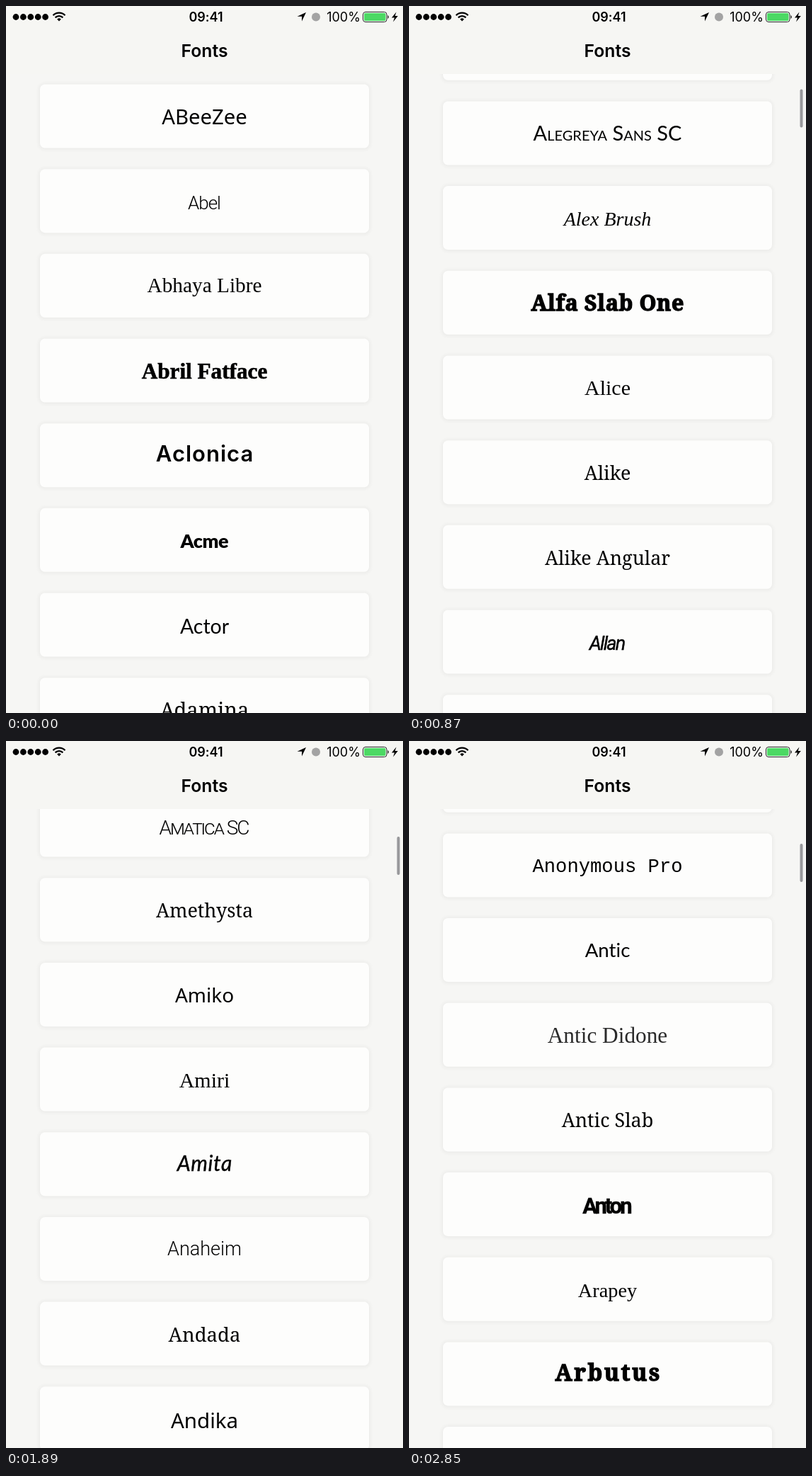
These frames come from a looping animation (561 by 998 pixels, 2880 ms). An HTML page:

```html
<!DOCTYPE html>
<html lang="en">
<head>
<meta charset="utf-8">
<title>Fonts</title>
<style>
  html, body { margin: 0; width: 100%; height: 100%; overflow: hidden; background: #f6f6f4; }
  svg { display: block; width: 100%; height: 100%; font-variant-ligatures: none; }
  .status, .title { font-family: Inter, sans-serif; }
  .title { font-size: 24.7px; font-weight: 600; text-anchor: middle; }
  .row text { text-anchor: middle; }
  .sans { font-family: 'Noto Sans', sans-serif; }
  .medium { font-family: 'Noto Sans', sans-serif; stroke: #000; stroke-width: .7; }
  .inter { font-family: Inter, sans-serif; font-weight: 500; }
  .round { font-family: Inter, sans-serif; font-weight: 600; }
  .arial { font-family: 'Liberation Sans', sans-serif; }
  .thin { font-family: Roboto, sans-serif; font-weight: 300; }
  .heavy { font-family: Roboto, sans-serif; font-weight: 700; stroke: #000; stroke-width: .4; }
  .lato { font-family: Lato, sans-serif; }
  .hand { font-family: Lato, sans-serif; font-weight: 300; stroke: #000; stroke-width: .3; }
  .bold { font-family: Lato, sans-serif; font-weight: 700; }
  .fat { font-family: Lato, sans-serif; font-weight: 900; }
  .slant { font-family: Lato, sans-serif; font-style: italic; stroke: #000; stroke-width: .4; }
  .brush { font-family: Roboto, sans-serif; font-style: italic; stroke: #000; stroke-width: .4; }
  .carved { font-family: Lato, sans-serif; font-style: italic; font-weight: 700; fill: #aaa; stroke: #222; stroke-width: .9; }
  .book { font-family: 'Liberation Serif', serif; }
  .quill { font-family: 'Liberation Serif', serif; stroke: #000; stroke-width: .6; }
  .pale { font-family: 'Liberation Serif', serif; fill: #b0b0b0; }
  .soft { font-family: 'Liberation Serif', serif; fill: #2a2a2a; }
  .ink { font-family: 'Liberation Serif', serif; font-weight: 700; }
  .poster { font-family: 'Liberation Serif', serif; font-weight: 700; stroke: #000; stroke-width: .6; }
  .script { font-family: 'Liberation Serif', serif; font-style: italic; }
  .serif { font-family: 'Noto Serif', serif; }
  .fine { font-family: 'Noto Serif', serif; font-weight: 300; }
  .slab { font-family: 'Noto Serif', serif; font-weight: 900; stroke: #000; stroke-width: 1.3; }
  .mono { font-family: 'Liberation Mono', monospace; }
  .caps { font-variant-caps: small-caps; }
</style>
</head>
<body>
<svg viewBox="0 0 561 998" preserveAspectRatio="none">
  <rect width="561" height="998" fill="#f6f6f4"/>
  <g id="list"></g>
  <rect id="thumb" x="552.5" width="4" height="54" rx="2" fill="#98989b"/>
  <rect width="561" height="96" fill="#f6f6f3"/>
  <g class="status" font-size="18">
    <g id="dots"></g>
    <g fill="none" stroke="#000" stroke-width="2.3">
      <path d="M66.5 13.2a12 12 0 0 1 17 0M69.6 16.4a7.6 7.6 0 0 1 10.8 0"/>
      <path d="M75 21.6l-2.8-2.9a4 4 0 0 1 5.6 0z" fill="#000" stroke="none"/>
    </g>
    <text x="282.5" y="21.5" font-weight="600" text-anchor="middle">09:41</text>
    <path d="M424 9L411.5 14.8H418V21.5z"/>
    <circle cx="438" cy="15.5" r="6" fill="#a3a3a3"/>
    <text x="477" y="21.5" text-anchor="middle">100%</text>
    <rect x="504.5" y="8.5" width="33.5" height="14" rx="3.5" fill="#fff" stroke="#222"/>
    <rect x="506" y="10" width="30.5" height="11" rx="2" fill="#4cd964"/>
    <path d="M539.5 13a3 3 0 0 1 0 5zM551.5 8.5L545 16.5H549L547 22.5L553.8 14H549.7z"/>
  </g>
  <text class="title" x="280.5" y="72">Fonts</text>
</svg>
<script>
const LOOP = 2880, STEP = 30, PITCH = 119.67, TOP = 110.5, DECAY = 225, FADE = 35;

// name, style, size, letter spacing, baseline shift
const fonts = [
  ['ABeeZee', 'sans', 29.3],
  ['Abel', 'thin', 26, -1, 1],
  ['Abhaya Libre', 'book', 29.3, 0, -2],
  ['Abril Fatface', 'poster', 31.2],
  ['Aclonica', 'round', 31, 1, -2],
  ['Acme', 'fat', 27, -.5],
  ['Actor', 'lato', 28.5, 0, 1],
  ['Adamina', 'serif', 29],
  ['Advent Pro', 'thin', 29],
  ['Aguafina Script', 'script', 26, -1.2, -4],
  ['Akronim', 'carved', 23.5, 0, -4],
  ['Aladin', 'ink', 27, -2, -2],
  ['Aldrich', 'inter', 30, 0, -4],
  ['Alef', 'sans', 30.5],
  ['Alegreya', 'book', 29],
  ['Alegreya SC', 'book caps', 30],
  ['Alegreya Sans', 'lato', 29],
  ['Alegreya Sans SC', 'lato caps', 29],
  ['Alex Brush', 'script', 28],
  ['Alfa Slab One', 'slab', 30.5, .6],
  ['Alice', 'book', 30],
  ['Alike', 'serif', 27],
  ['Alike Angular', 'serif', 27],
  ['Allan', 'brush', 27, -1.8, 1],
  ['Allerta', 'medium', 30, 1.6, 1],
  ['Allerta Stencil', 'medium', 30, 1.6, 1],
  ['Allura', 'script', 28, 1, -3],
  ['Almendra', 'quill', 30, .4, -1],
  ['Almendra Display', 'pale', 30, .4, -1],
  ['Almendra SC', 'quill caps', 29.5],
  ['Amarante', 'ink', 28.5],
  ['Amaranth', 'bold', 28, 0, 1],
  ['Amatic SC', 'thin caps', 25.5, -2.5, 1],
  ['Amatica SC', 'thin caps', 28, -2, 2],
  ['Amethysta', 'serif', 27],
  ['Amiko', 'sans', 28],
  ['Amiri', 'book', 30],
  ['Amita', 'slant', 30, .6, -1],
  ['Anaheim', 'thin', 27, 0, -2],
  ['Andada', 'serif', 27.5],
  ['Andika', 'sans', 29.5, 0, 3],
  ['Angkor', 'arial', 30, 0, -2],
  ['Annie Use Your Telescope', 'hand', 24, -.4, -1],
  ['Anonymous Pro', 'mono', 27.2, 0, -1],
  ['Antic', 'lato', 27.7, 0, -1],
  ['Antic Didone', 'soft', 31.3],
  ['Antic Slab', 'fine', 27],
  ['Anton', 'heavy', 31, -3, 2],
  ['Arapey', 'book', 28.3],
  ['Arbutus', 'slab', 32, 2.5, -1],
  ['Arbutus Slab', 'serif', 28]
];

// Each flick: start time, start offset, distance it would coast
const flicks = [
  [60, 0, 859],
  [560, 766, 1664],
  [1140, 2303, 995],
  [1620, 3181, 1152],
  [2090, 4190, 969]
];

function offset(t) {
  const flick = flicks.findLast(f => f[0] <= t);
  if (!flick) return 0;
  const [start, from, reach] = flick;
  return from + reach * (1 - Math.exp((start - t) / DECAY));
}

function add(parent, tag, attrs) {
  const el = document.createElementNS('http://www.w3.org/2000/svg', tag);
  for (const key in attrs) el.setAttribute(key, attrs[key]);
  return parent.appendChild(el);
}

// Time at which a row first reaches the bottom edge
function entryTime(i) {
  const need = TOP + i * PITCH - 15 - 998;
  if (need <= 0) return -FADE;
  let t = 0;
  while (t < LOOP && offset(t) < need) t++;
  return t;
}

const list = document.getElementById('list');
const thumb = document.getElementById('thumb');
const dots = document.getElementById('dots');
for (let i = 0; i < 5; i++) add(dots, 'circle', { cx: 14 + i * 10.4, cy: 15.5, r: 4.4 });

const rows = fonts.map(([name, style, size, gap = 0, shift = 0], i) => {
  const group = add(list, 'g', { class: 'row' });
  const card = { x: 48, y: 0, width: 465, height: 90, rx: 7 };
  for (const width of [10, 7, 4, 2])
    add(group, 'rect', { ...card, y: .5, fill: 'none', stroke: '#000', 'stroke-opacity': .009, 'stroke-width': width });
  add(group, 'rect', { ...card, fill: '#fdfdfc' });
  const label = add(group, 'text', {
    class: style, x: 280.5 + gap / 2, y: 56 + shift, 'font-size': size, 'letter-spacing': gap
  });
  label.textContent = name;
  return { group, label, enter: entryTime(i) };
});

function draw(now) {
  const t = Math.floor(now % LOOP / STEP) * STEP;
  const scroll = offset(t);
  rows.forEach(({ group, label, enter }, i) => {
    const y = TOP + i * PITCH - scroll;
    group.style.display = y > -100 && y < 1005 ? '' : 'none';
    group.setAttribute('transform', `translate(0 ${y.toFixed(2)})`);
    label.setAttribute('opacity', Math.max(0, Math.min(1, (t - enter) / FADE)));
  });
  thumb.setAttribute('y', 99.9 + scroll * .0088);
  thumb.setAttribute('opacity', t > flicks[0][0] ? 1 : 0);
}

const begin = performance.now();
function tick() {
  draw(performance.now() - begin);
  requestAnimationFrame(tick);
}
tick();
</script>
</body>
</html>
```
